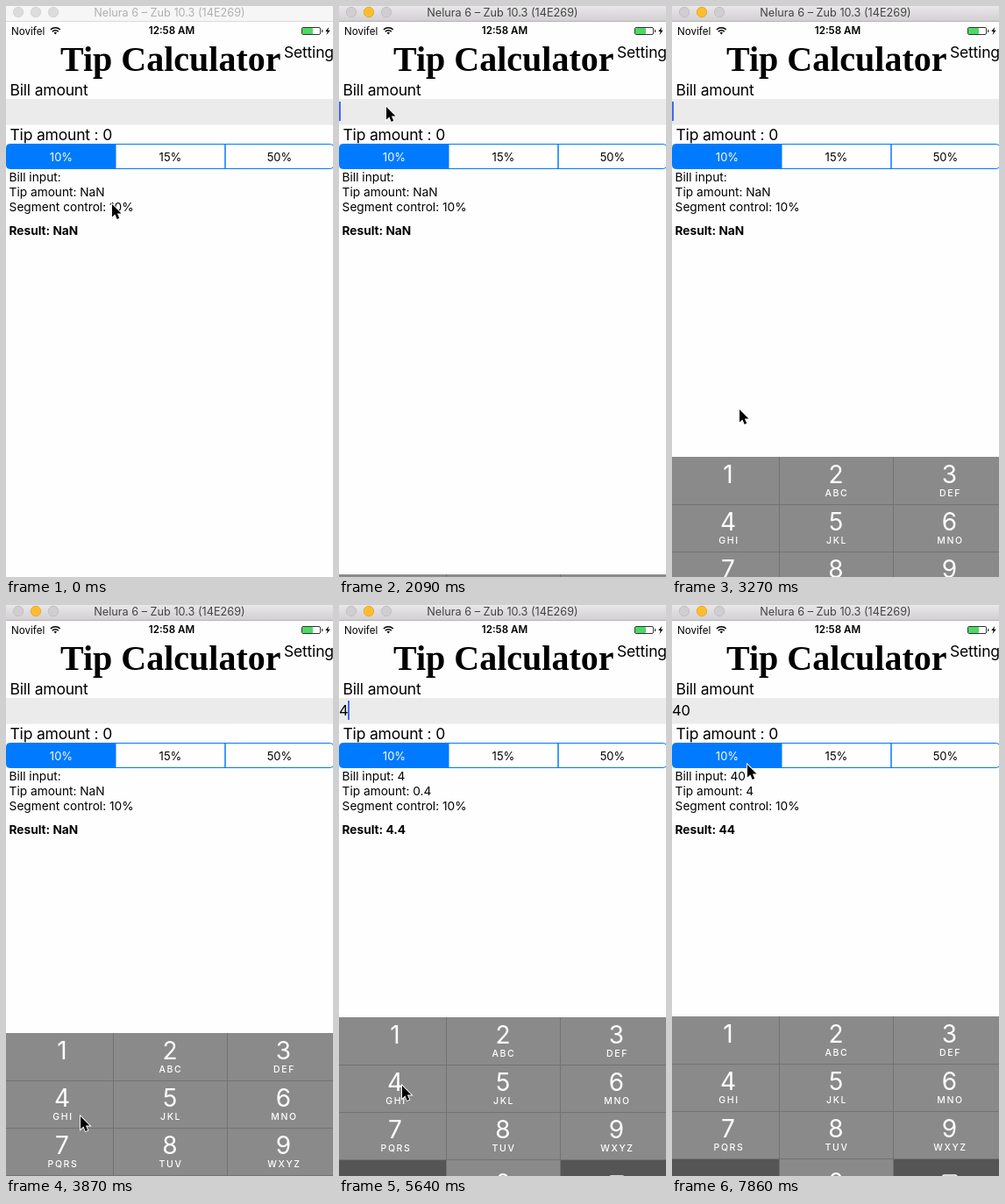
Animation of 373x651 px, one loop 8000 ms. Source, as an HTML page:

```html
<!DOCTYPE html>
<html lang="en">
<head>
<meta charset="utf-8">
<title>Tip Calculator</title>
<style>
  html, body { margin: 0; width: 100%; height: 100%; overflow: hidden; background: #fefefe; }
  svg { display: block; }
  text { font: 13.7px Inter, "Liberation Sans", sans-serif; white-space: pre; }
  .mid { text-anchor: middle; }
  .label { font-size: 17.5px; letter-spacing: -.19px; }
  .value { font-size: 16.5px; letter-spacing: -.2px; }
  .head { font: bold 40px "Liberation Serif", serif; }
  .bar { font-size: 12.7px; }
  .status { font-size: 11.6px; }
  .bold { font-weight: 700; }
  .semi { font-weight: 600; }
  .seg { font-size: 13px; }
  .digit { font-size: 28px; fill: #fff; }
  .abc { font-size: 10.5px; font-weight: 500; letter-spacing: 1.6px; fill: #fff; }
</style>
</head>
<body>
<svg width="373" height="651" viewBox="0 0 373 651">
  <defs>
    <linearGradient id="steel" x2="0" y2="1">
      <stop stop-color="#e9e7e9"/><stop offset="1" stop-color="#d2d0d2"/>
    </linearGradient>
  </defs>
  <rect width="373" height="651" fill="#fefefe"/>

  <rect id="barFill" width="373" height="17"/>
  <rect id="barLine" y="17" width="373" height="1"/>
  <g id="lights" stroke-width=".8">
    <circle cx="14" cy="7" r="5.7"/><circle cx="34" cy="7" r="5.7"/><circle cx="54" cy="7" r="5.7"/>
  </g>
  <text id="barText" class="bar mid" x="186.5" y="12">Nelura 6 – Zub 10.3 (14E269)</text>

  <text class="status" x="6" y="32.5">Novifel</text>
  <g fill="none" stroke="#000" stroke-width="1.6">
    <path d="M50.9 27a7.6 7.6 0 0 1 10.8 0M52.8 29.2a4.9 4.9 0 0 1 7 0"/>
    <path d="M56.3 32.4l-1.7-1.8a2.4 2.4 0 0 1 3.4 0z" fill="#000" stroke="none"/>
  </g>
  <text class="status semi mid" x="189" y="32.3">12:58 AM</text>
  <rect x="337.5" y="24.5" width="21" height="8" rx="1.5" fill="#fff" stroke="#333"/>
  <rect x="338" y="25" width="12" height="7" rx="1" fill="#4cd964"/>
  <rect x="360" y="27" width="1.3" height="3" rx=".6" fill="#333"/>
  <path d="M368.3 24l-4 5h2.4l-1.2 4 4.2-5.3h-2.5z"/>

  <text class="head" x="62" y="74">Tip Calculator</text>
  <text class="label" x="317" y="59">Setting</text>
  <text class="label" x="4.5" y="102">Bill amount</text>
  <rect y="106" width="373" height="29.5" fill="#ebebeb"/>
  <text id="field" class="value" x="0" y="126"></text>
  <rect id="caret" y="109" width="2" height="22" fill="#426bf2"/>
  <text class="label" x="4.5" y="153">Tip amount : 0</text>

  <rect x=".5" y="157.5" width="373.4" height="28" rx="4" fill="#fff" stroke="#007aff"/>
  <path d="M125.5 157.5H4.5a4 4 0 0 0-4 4v20a4 4 0 0 0 4 4h121z" fill="#007aff"/>
  <path d="M250 157v29" stroke="#007aff" stroke-width="1.5"/>
  <text class="seg mid" x="63" y="176.5" fill="#fff">10%</text>
  <text class="seg mid" x="187.5" y="176.5">15%</text>
  <text class="seg mid" x="312" y="176.5">50%</text>

  <text id="bill" x="3.6" y="200"></text>
  <text id="tip" x="3.6" y="217"></text>
  <text x="3.6" y="234">Segment control: 10%</text>
  <text id="result" class="bold" x="3.5" y="261"></text>

  <g id="pad"></g>
  <path id="pointer" d="M0 0V14.6L3.4 11.5 5.7 16.9 8.2 15.8 5.9 10.6H10.5Z" stroke="#fff" stroke-width="1.8" paint-order="stroke"/>
</svg>
<script>
const $ = id => document.getElementById(id);
const set = (id, attrs) => { for (const k in attrs) $(id).setAttribute(k, attrs[k]); };
const STEP = 148.2, LOOP = 8000;

function buildPad() {
  const cols = [[0, 122, 64], [123, 129, 187], [253, 120, 316.5]];
  const letters = ['', 'ABC', 'DEF', 'GHI', 'JKL', 'MNO', 'PQRS', 'TUV', 'WXYZ'];
  let s = '<rect width="373" height="220" fill="#727272"/>';
  for (let i = 0; i < 12; i++) {
    const [x, w, mid] = cols[i % 3], y = Math.floor(i / 3) * 54;
    const side = i === 9 || i === 11, gap = y ? 1 : 0;
    s += `<rect x="${x}" y="${y + gap}" width="${w}" height="${54 - gap}" fill="${side ? '#555' : '#8a8a8a'}"/>`;
    if (i < 9) {
      s += `<text class="digit mid" x="${mid}" y="${y + 29.5}">${i + 1}</text>
        <text class="abc mid" x="${mid + 1}" y="${y + 45.3}">${letters[i]}</text>`;
    } else if (i === 10) {
      s += `<text class="digit mid" x="${mid}" y="${y + 37}">0</text>`;
    } else if (i === 11) {
      s += `<path d="M310 ${y + 19}h13q2 0 2 2v12q0 2-2 2h-13l-8-8z" fill="none" stroke="#fff" stroke-width="1.6"/>`;
    }
  }
  $('pad').innerHTML = s;
}

// Pointer stops: step, x, y
const stops = [
  [1, 121, 226], [2, 108, 176], [3, 98, 134], [4, 98, 134], [5, 92, 159], [6, 80, 150],
  [7, 66, 135], [8, 57, 121], [9, 54, 115], [18, 54, 115], [20, 62, 260], [23, 84, 560],
  [26, 85, 583], [29, 80, 562], [31, 72, 548], [39, 72, 548], [43, 184, 634],
  [46, 184, 634], [49, 121, 284], [51, 121, 284], [52, 98, 216], [53, 86, 182]
];

function pointerAt(n) {
  const i = stops.findIndex(s => s[0] >= n);
  if (i < 1) return stops[i < 0 ? stops.length - 1 : 0].slice(1);
  const [a, b] = [stops[i - 1], stops[i]], k = (n - a[0]) / (b[0] - a[0]);
  return [1, 2].map(j => Math.round(a[j] + (b[j] - a[j]) * k));
}

// The caret blinks once a second and stays solid just after a key
function caretAlpha(n, ms) {
  const lastKey = n >= 45 ? 45 : n >= 37 ? 37 : 12;
  if (n < 12) return 0;
  if (n - lastKey < 4) return 1;
  const p = ms % 1000;
  if (p < 570) return 1;
  return p < 670 ? (670 - p) / 100 : Math.max(0, (p - 886) / 114);
}

// Critically damped slide up from below the screen
function padTop(ms) {
  const u = Math.max(0, ms - 1687) * .00185;
  return Math.round(469 + 215 * (1 + u) * Math.exp(-u));
}

function draw(t) {
  const n = Math.max(0, Math.floor((t - 2) / STEP)), ms = n * STEP + 8;
  const active = n >= 11;
  set('barFill', { fill: active ? 'url(#steel)' : '#f6f6f6' });
  set('barLine', { fill: active ? '#b5b3b5' : '#dadada' });
  set('barText', { fill: active ? '#444' : '#b0b0b0' });
  [...$('lights').children].forEach((c, i) => {
    const on = active && i === 1;
    c.setAttribute('fill', on ? '#fdbd2d' : active ? '#d0ced0' : '#dcdcdc');
    c.setAttribute('stroke', on ? '#dfa128' : active ? '#bcbabc' : '#cfcfcf');
  });

  const value = n >= 45 ? '40' : n >= 37 ? '4' : '';
  const tip = value ? value / 10 : NaN;
  $('field').textContent = value;
  $('bill').textContent = 'Bill input: ' + value;
  $('tip').textContent = 'Tip amount: ' + tip;
  $('result').textContent = 'Result: ' + (+value + tip);
  set('caret', { x: value.length * 10, opacity: caretAlpha(n, ms) });
  set('pad', { transform: `translate(0 ${padTop(ms)})` });
  set('pointer', { transform: `translate(${pointerAt(n)})` });
}

buildPad();
const start = performance.now();
function tick() {
  draw((performance.now() - start) % LOOP);
  requestAnimationFrame(tick);
}
tick();
</script>
</body>
</html>
```
